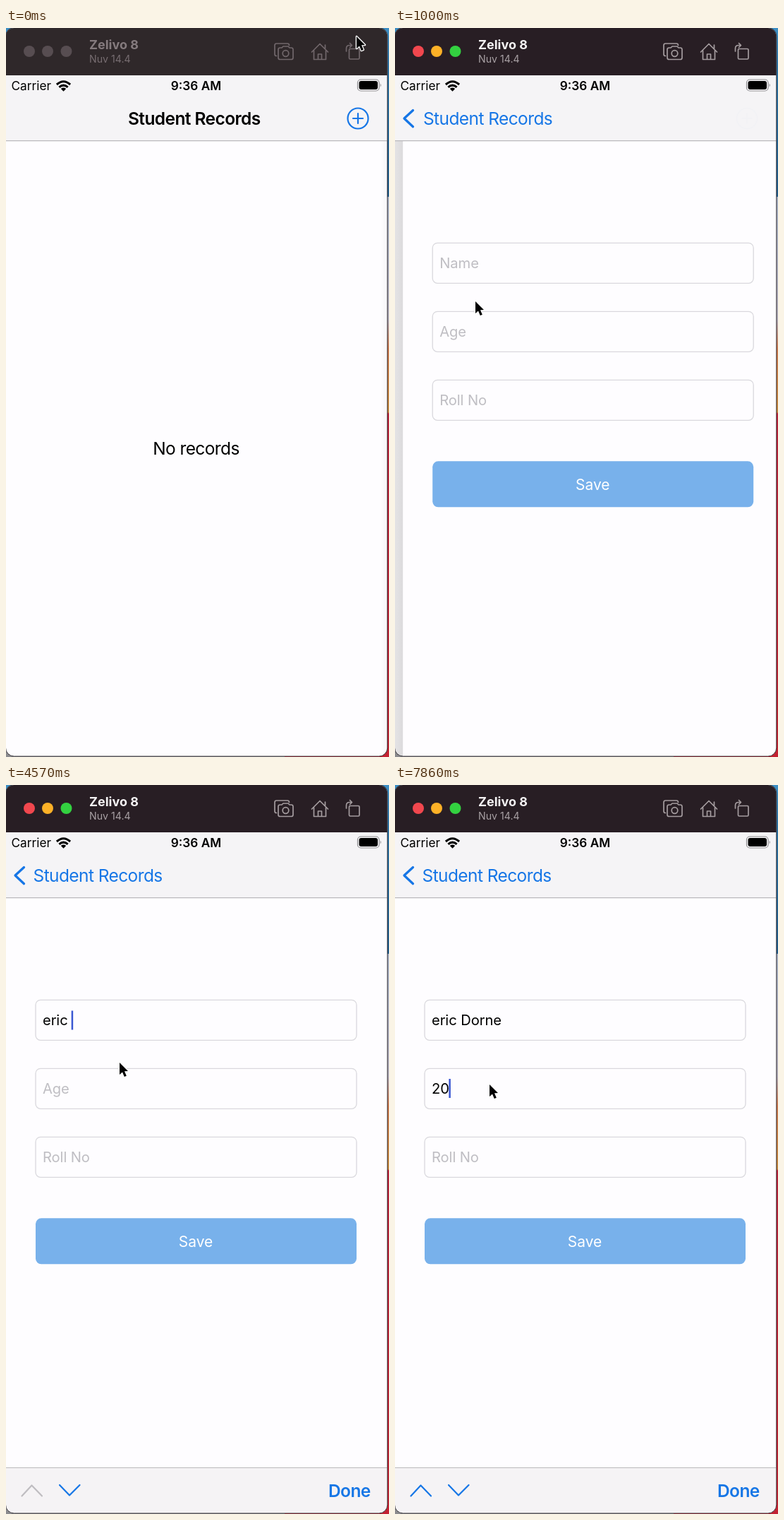
Recreate the animation shown at these times as an HTML page. Size 543 px wide and 1032 px high, loop 8000 ms.

```html
<!DOCTYPE html>
<html lang="en">
<head>
<meta charset="utf-8">
<title>Student Records</title>
<style>
  html, body { margin: 0; width: 100%; height: 100%; overflow: hidden; background: #fff; }
  svg { display: block; width: 100vw; height: 100vh; }
  text { font-family: Inter, sans-serif; white-space: pre; }
  .nav { font-size: 24.5px; letter-spacing: -0.024em; }
  .semi { font-weight: 600; }
  .field { font-size: 20.2px; letter-spacing: -0.005em; fill: #000; }
  .hint { fill: #bfbec3; }
  .status { font-size: 17.3px; }
  .box { fill: #fefdff; stroke: #d9d8dd; stroke-width: 1.3; }
  .line { fill: none; stroke-linecap: round; stroke-linejoin: round; }
  .blue { stroke: #1676e6; }
  .blueText { fill: #1676e6; }
  #chrome { --bar: #281e24; --name: #f5f3f4; --sub: #a8a0a4; --icon: #a49c9f;
            --red: #f1474e; --amber: #fcb127; --green: #33d140; }
  #chrome.idle { --bar: #2f282a; --name: #857b7e; --sub: #776d71; --icon: #71676b;
                 --red: #574d51; --amber: #574d51; --green: #574d51; }
</style>
</head>
<body>
<svg viewBox="0 0 543 1032" preserveAspectRatio="none">
  <defs>
    <linearGradient id="desktop" x2="0" y2="1">
      <stop offset="0" stop-color="#3d8fc4"/><stop offset=".05" stop-color="#2a75ab"/>
      <stop offset=".231" stop-color="#1f5c8c"/><stop offset=".232" stop-color="#a9b4c8"/>
      <stop offset=".4" stop-color="#b3aebb"/><stop offset=".44" stop-color="#cf7a4e"/>
      <stop offset=".527" stop-color="#c98a3c"/><stop offset=".529" stop-color="#c0203a"/>
      <stop offset="1" stop-color="#c22232"/>
    </linearGradient>
    <linearGradient id="edge">
      <stop offset="0" stop-color="#000" stop-opacity="0"/><stop offset="1" stop-color="#000" stop-opacity=".035"/>
    </linearGradient>
    <clipPath id="window"><rect x="-.5" width="541" height="1031" rx="12"/></clipPath>
  </defs>

  <rect width="543" height="1032" fill="url(#desktop)"/>
  <rect y="1000" width="395" height="32" fill="#8b8b8e"/>

  <g clip-path="url(#window)">
    <rect width="541" height="1032" fill="#fefdff"/>
    <g id="list">
      <text class="nav" x="269.5" y="604" text-anchor="middle">No records</text>
    </g>
    <rect id="dim" y="160" width="541" height="872"/>

    <g id="form">
      <rect x="-10" y="160" width="10" height="872" fill="url(#edge)"/>
      <rect y="160" width="541" height="872" fill="#fefdff"/>
      <rect class="box" x="42" y="304.3" width="455" height="57" rx="7"/>
      <rect class="box" x="42" y="401.3" width="455" height="57" rx="7"/>
      <rect class="box" x="42" y="498.3" width="455" height="57" rx="7"/>
      <text id="name" class="field" x="52" y="340"></text>
      <text id="age" class="field" x="52" y="437"></text>
      <text class="field hint" x="52" y="534">Roll No</text>
      <rect x="42" y="613.3" width="455" height="65" rx="8" fill="#78b1eb"/>
      <text x="269" y="653.5" text-anchor="middle" font-size="21" fill="#fff">Save</text>
      <rect id="caret" width="2.5" height="27" fill="#3b58d2"/>
    </g>

    <g id="toolbar">
      <rect y="966" width="541" height="70" fill="#f5f3f5"/>
      <path d="M0 966.5H541" stroke="#bbb9bc" stroke-width="1.2"/>
      <path id="up" class="line" d="M22.5 1006.5L36.5 991.5L51 1006.5" stroke-width="2.2"/>
      <path class="line blue" d="M76 991L90 1005.5L104.500 991" stroke-width="2.2"/>
      <text class="nav semi blueText" x="457" y="1007.500">Done</text>
    </g>

    <rect y="67" width="541" height="92.500" fill="#f5f4f6"/>
    <path d="M0 159.700H541" stroke="#bab9bc" stroke-width="1.2"/>
    <text class="status" x="7.500" y="88">Carrier</text>
    <text class="status semi" x="269.500" y="88" text-anchor="middle">9:36 AM</text>
    <g fill="none" stroke="#000" stroke-width="3.100">
      <path d="M71.900 80Q81.500 71.500 91.100 80"/>
      <path d="M75.400 83.900Q81.500 78.300 87.600 83.900"/>
    </g>
    <path d="M77.800 86Q81.500 83.200 85.200 86L81.500 89.800Z"/>
    <rect x="498.500" y="73" width="30.500" height="16" rx="4.500" fill="none" stroke="#8e8d90" stroke-width="1.2"/>
    <rect x="500.500" y="75" width="26.500" height="12" rx="3"/>
    <path d="M530.700 78.500q2.200 2.500 0 5z" fill="#8e8d90"/>

    <g id="plus" class="line blue" stroke-width="2.200">
      <circle cx="499" cy="128" r="14.500"/>
      <path d="M492 128h14M499 121v14"/>
    </g>
    <path id="back" class="line blue" d="M25.500 116.500L13 128L25.500 139.700" stroke-width="3.300"/>
    <text id="title" class="nav semi" x="173" y="136.500">Student Records</text>
    <text id="backLabel" class="nav blueText" x="38.500" y="136.500">Student Records</text>

    <g id="chrome">
      <rect width="541" height="67" fill="var(--bar)"/>
      <circle cx="33" cy="33" r="8" fill="var(--red)"/>
      <circle cx="59" cy="33" r="8" fill="var(--amber)"/>
      <circle cx="85.500" cy="33" r="8" fill="var(--green)"/>
      <text x="118" y="30" font-size="18" font-weight="700" fill="var(--name)">Zelivo 8</text>
      <text x="118" y="48.500" font-size="14.200" fill="var(--sub)">Nuv 14.4</text>
      <g class="line" stroke="var(--icon)" stroke-width="1.700">
        <path d="M383.500 39.500Q381 39.500 381 37V24.500Q381 22 383.500 22H399Q401.500 22 401.500 24.500"/>
        <path d="M388.500 44.500Q386 44.500 386 42V30.500Q386 28 388.500 28H391L393 26H400L402 28H404.500Q407 28 407 30.500V42Q407 44.500 404.500 44.500Z"/>
        <circle cx="396.500" cy="36" r="4.300"/>
        <path d="M433.500 34L445 22.500L456.500 34M436.500 32V44.500H453.500V32M452.500 29V24M442.500 44V37H447.500V44"/>
        <rect x="486.500" y="29.500" width="14.500" height="14.500" rx="1.500"/>
        <path d="M482.500 33V29Q482.500 24.500 487 24.500H489.500M487.500 21.500L490.500 24.500L487.500 27.500"/>
      </g>
    </g>
  </g>
  <rect x="-.5" y="-.5" width="541.300" height="1031.500" rx="12" fill="none" stroke="#39363b" stroke-width="1"/>
  <path id="cursor" d="M0 0V17L4 13.500L6.800 20L9.800 18.700L7 12.300L12 12Z" stroke="#fff" stroke-width="2.600" stroke-linejoin="round" paint-order="stroke"/>
</svg>

<script>
const LOOP = 8000, STEPS = 56;
const $ = id => document.getElementById(id);
const set = (id, attrs) => {
  for (const key in attrs) $(id).setAttribute(key, attrs[key]);
};
const move = (x, y) => `translate(${x} ${y})`;
const clamp = v => Math.max(0, Math.min(1, v));

// Critically damped spring from 0 to 1, starting at a given time
const spring = (ms, start) => {
  const w = Math.max(0, ms - start) * 0.0181;
  return 1 - (1 + w) * Math.exp(-w);
};

// Pointer stops: step, x, y
const pointer = [
  [0, 497, 12], [1, 499, 50], [2, 500, 100], [3, 499, 125], [4, 498, 130],
  [5, 480, 169], [6, 270, 300], [7, 114, 387], [8, 102, 362], [9, 106, 340],
  [11, 112, 338], [13, 161, 393], [45, 161, 393], [48, 134, 424], [56, 134, 424]
];
function pointerAt(step) {
  const i = pointer.findIndex(stop => stop[0] > step);
  const [s0, x0, y0] = pointer[i - 1], [s1, x1, y1] = pointer[i];
  const k = (step - s0) / (s1 - s0);
  return [x0 + (x1 - x0) * k, y0 + (y1 - y0) * k];
}

// Steps at which each character is typed
const nameKeys = [16, 18, 20, 22, 28, 33, 35, 37, 39, 41];
const ageKeys = [52, 54];
const typed = (text, keys, step) => text.slice(0, keys.filter(k => k <= step).length);

function showField(id, value, hint) {
  $(id).textContent = value || hint;
  $(id).classList.toggle("hint", !value);
  return value ? $(id).getComputedTextLength() : 0;
}

function draw(step) {
  const ms = step * LOOP / STEPS;
  const push = spring(ms, 680);
  const slide = (push + push * push * (3 - 2 * push)) / 2;
  const label = clamp((push - 0.13) * 1.25);

  $("chrome").classList.toggle("idle", step < 3);
  set("list", { transform: move(-162 * push, 0) });
  set("dim", { opacity: 0.11 * push });
  set("form", { transform: move(541 * (1 - push), 0) });
  set("title", { transform: move(-134.5 * slide, 0), opacity: 1 - label });
  set("backLabel", { transform: move(134.5 * (1 - slide), 0), opacity: label });
  set("back", { opacity: clamp(push * 1.6) });
  set("plus", { opacity: step < 4 ? 1 : 0.3 * (1 - push) });

  const onAge = step >= 49;
  const nameWidth = showField("name", typed("eric Dorne", nameKeys, step), "Name");
  const ageWidth = showField("age", typed("20", ageKeys, step), "Age");
  set("caret", {
    x: 52.3 + (onAge ? ageWidth : nameWidth) - (step < 16 ? 0 : 0.8),
    y: onAge ? 416 : 319.5,
    opacity: step >= 12 ? 1 : 0
  });

  set("toolbar", { transform: move(0, 67 * (1 - spring(ms, 1600))) });
  set("up", { stroke: onAge ? "#1676e6" : "#bfbdc1" });
  set("cursor", { transform: move(...pointerAt(step)) });
}

const start = performance.now();
function tick() {
  const t = (performance.now() - start) % LOOP;
  draw(Math.floor((t + 5) * STEPS / LOOP) % STEPS);
  requestAnimationFrame(tick);
}
tick();
</script>
</body>
</html>
```
